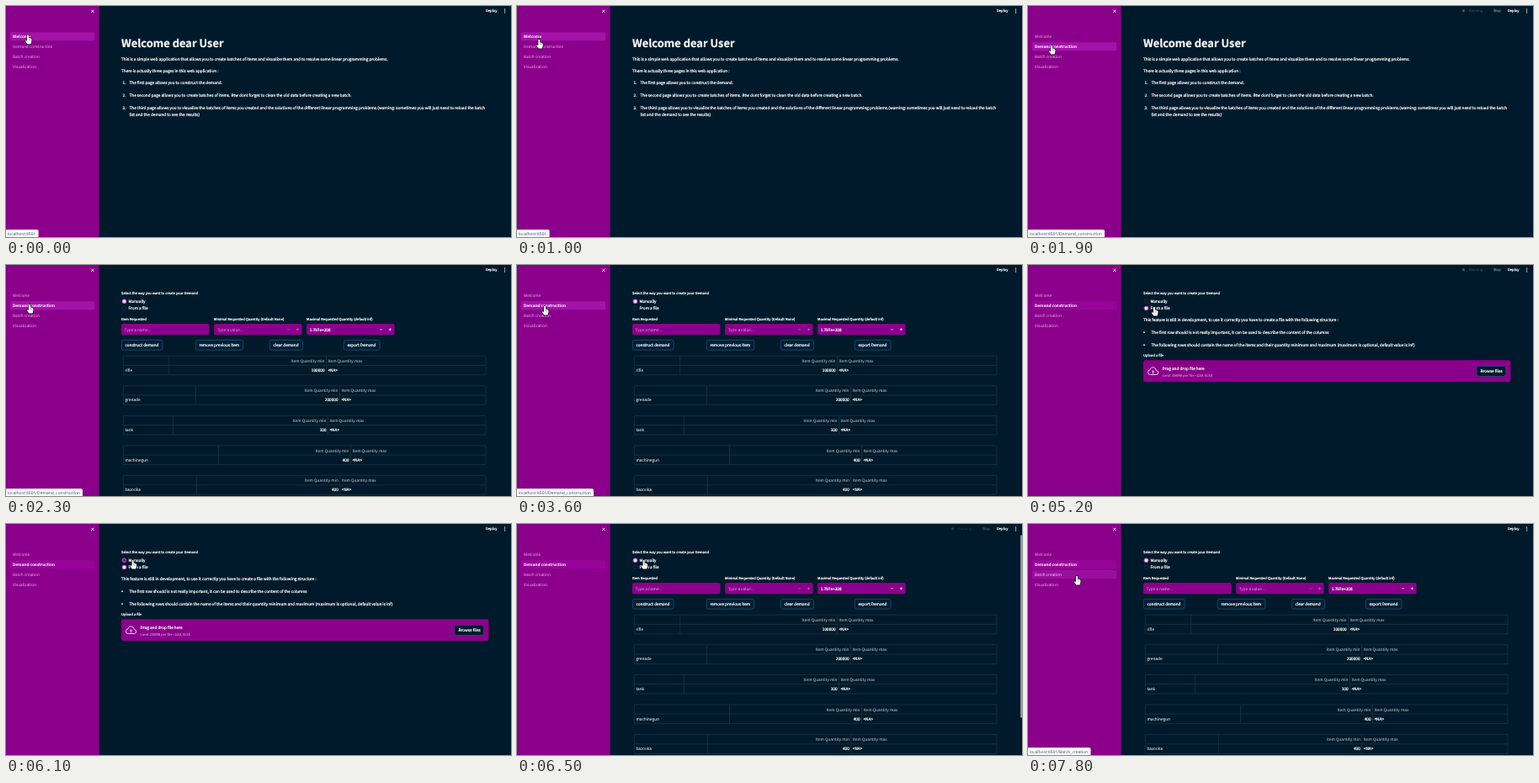
Animation of 600 by 275 pixels, one loop 8 s. Source, as an HTML page with a canvas:

```html
<!DOCTYPE html>
<html lang="en">
<head>
<meta charset="utf-8">
<title>Demand planner</title>
<style>
html, body { margin: 0; width: 100%; height: 100%; overflow: hidden; background: #001a2b; }
canvas { display: block; width: 600px; height: 275px; }
</style>
</head>
<body>
<canvas id="stage"></canvas>
<script>
const W = 600, H = 275, LOOP = 8000, STEP = 100;
const canvas = document.getElementById('stage');
const dpr = window.devicePixelRatio || 1;
canvas.width = W * dpr;
canvas.height = H * dpr;
const ctx = canvas.getContext('2d');

const BG = '#001a2b', PURPLE = '#8b008b', WHITE = '#fafafa';
const DIM = '#b0bac3', PINK = '#e096e2', LINE = '#1c3445';
const SANS = '"Noto Sans CJK JP", "Noto Sans CJK SC", "Noto Sans CJK", "Open Sans", sans-serif';
const BODY = 4.715, SMALL = 4.12, TITLE = 12.9;
const ZOOM = 20; // lay text out large, then shrink, for even spacing

// y is the middle of the capitals
function text(str, x, y, o = {}) {
  const { size = BODY, color = WHITE, bold = false, align = 'left', family = SANS, heavy = 0.24 } = o;
  ctx.save();
  ctx.translate(x, y + size * 0.366);
  ctx.scale(1 / ZOOM, 1 / ZOOM);
  ctx.font = `${bold ? 700 : 400} ${size * ZOOM}px ${family}`;
  ctx.textAlign = align;
  ctx.fillStyle = ctx.strokeStyle = color;
  ctx.fillText(str, 0, 0);
  if (heavy) {
    ctx.lineWidth = heavy * ZOOM;
    ctx.lineJoin = 'round';
    ctx.strokeText(str, 0, 0);
  }
  ctx.restore();
}

function box(x, y, w, h, r, fill, stroke) {
  ctx.beginPath();
  ctx.roundRect(x, y, w, h, r);
  if (fill) { ctx.fillStyle = fill; ctx.fill(); }
  if (stroke) { ctx.strokeStyle = stroke; ctx.lineWidth = 0.7; ctx.stroke(); }
}

function dot(x, y, r, fill) {
  ctx.beginPath();
  ctx.arc(x, y, r, 0, Math.PI * 2);
  ctx.fillStyle = fill;
  ctx.fill();
}

function lines(color, width, ...segs) {
  ctx.beginPath();
  for (const [x1, y1, x2, y2] of segs) {
    ctx.moveTo(x1, y1);
    ctx.lineTo(x2, y2);
  }
  ctx.strokeStyle = color;
  ctx.lineWidth = width;
  ctx.stroke();
}

function minus(x, y, color) {
  lines(color, 0.7, [x - 1.3, y, x + 1.3, y]);
}

function plus(x, y, color) {
  lines(color, 0.8, [x - 1.5, y, x + 1.5, y], [x, y - 1.5, x, y + 1.5]);
}

const MENU = ['Welcome', 'Demand construction', 'Batch creation', 'Visualization'];

function sidebar(active, hover) {
  ctx.fillStyle = PURPLE;
  ctx.fillRect(0, 0, 110.6, H);
  lines('#ffffff', 0.9, [101.2, 4.7, 104.4, 7.9], [104.4, 4.7, 101.2, 7.9]);
  MENU.forEach((name, i) => {
    const y = 36.2 + i * 11.9;
    if (i === active) box(5, y - 4.9, 100, 10, 1.3, '#98049a');
    if (i === hover) box(5, y - 4.9, 100, 10, 1.3, 'rgba(210,90,230,.18)');
    if (i === active) text(name, 8, y, { bold: true, heavy: 0.06 });
    else text(name, 8, y, { color: i === hover ? '#ecbdec' : PINK, heavy: 0.06 });
  });
}

function toolbar(running) {
  text('Deploy', 570, 5.7, { size: SMALL });
  for (let i = 0; i < 3; i++) dot(592.6, 3.9 + i * 2, 0.65, WHITE);
  if (!running) return;
  ctx.globalAlpha = running;
  dot(517.5, 5.7, 1.6, DIM);
  text('Running...', 524, 5.7, { size: SMALL, color: DIM, heavy: 0 });
  text('Stop', 553, 5.7, { size: SMALL });
  ctx.globalAlpha = 1;
}

function welcomePage() {
  text('Welcome dear User', 137, 44.3, { size: TITLE, bold: true });
  text('This is a simple web application that allows you to create batches of items and visualize them and to resolve some linear programming problems.', 137, 63.2);
  text('There is actually three pages in this web application :', 137, 76.9);
  const list = [
    ['The first page allows you to construct the demand.', 91.5],
    ['The second page allows you to create batches of items. Btw dont forget to clean the old data before creating a new batch.', 106.3],
    ['The third page allows you to visualize the batches of items you created and the solutions of the different linear programming problems.(warning: sometimes you will just need to reload the batch', 121.2]
  ];
  list.forEach(([str, y], i) => {
    text(`${i + 1}.`, 138.6, y);
    text(str, 146.5, y);
  });
  text('list and the demand to see the results)', 146.5, 129.6);
}

function radio(y, label, on, pressed) {
  if (on) {
    dot(140.5, y, 2.8, '#c45fcb');
    dot(140.5, y, 1.7, '#f6e6f7');
  } else {
    dot(140.5, y, 2.7, pressed ? '#b04cba' : '#1b2a45');
    dot(140.5, y, 1.8, pressed ? '#6b2382' : '#03182a');
  }
  text(label, 145.5, y + 0.2);
}

function chooser(fromFile, pressed) {
  text('Select the way you want to create your Demand', 137, 33.4, { size: SMALL });
  radio(43.3, 'Manually', !fromFile, pressed);
  radio(51.5, 'From a file', fromFile, false);
}

function field(x, label, value, color, stepColor) {
  text(label, x, 64.4, { size: SMALL });
  box(x, 69.9, 104.5, 13.4, 2, PURPLE);
  text(value, x + 3.6, 76.8, { color, heavy: color === WHITE ? 0.24 : 0.04 });
  if (stepColor) {
    minus(x + 88.5, 76.8, stepColor);
    plus(x + 99.3, 76.8, stepColor);
  }
}

const BUTTONS = [
  ['construct demand', 137, 48.8], ['remove previous item', 225, 56.5],
  ['clear demand', 313, 39.2], ['export Demand', 401, 42.8]
];

function form() {
  field(137, 'Item Requested', 'Type a name...', PINK);
  field(247.1, 'Minimal Requested Quantity (Default None)', 'Type a value...', PINK, '#bd66c0');
  field(357.1, 'Maximal Requested Quantity (default inf)', '1.797e+308', WHITE, WHITE);
  for (const [label, x, w] of BUTTONS) {
    box(x + 0.3, 89.4, w, 11.8, 2.2, '#021f35', '#28547c');
    text(label, x + 4.4, 95.4);
  }
}

const TABLES = [
  ['rifle', 100000, 193.7, 380.5], ['grenade', 200000, 225.4, 396.5],
  ['tank', 100, 198.5, 382.5], ['machinegun', 400, 252.5, 409.5],
  ['bazooka', 400, 226.3, 396.8]
];

function table([name, min, x1, x2], i) {
  const y = 108.2 + i * 35.6, mid = y + 11.2, end = y + 22.6;
  lines(LINE, 0.8,
    [139.3, y, 570, y], [139.3, mid, 570, mid], [139.3, end, 570, end],
    [139.3, y, 139.3, end], [x1, y, x1, end], [x2, y, x2, end], [570, y, 570, end]);
  const head = { color: DIM, heavy: 0.08 };
  text('Item Quantity min', x2 - 2, y + 5.8, { ...head, align: 'right' });
  text('Item Quantity max', x2 + 2, y + 5.8, head);
  text(name, 141.4, y + 16.8, { color: '#dde2e6', heavy: 0.1 });
  text(String(min), x2 - 2, y + 16.8, { align: 'right' });
  text('<NA>', x2 + 2, y + 16.8);
}

function cloud(x, y) {
  ctx.beginPath();
  ctx.moveTo(x + 3, y + 9);
  ctx.arc(x + 3, y + 6.2, 2.8, Math.PI / 2, Math.PI * 1.45);
  ctx.arc(x + 6.2, y + 4, 3.6, Math.PI * 1.08, Math.PI * 1.92);
  ctx.arc(x + 10, y + 6.6, 2.4, Math.PI * 1.5, Math.PI / 2);
  ctx.closePath();
  ctx.strokeStyle = '#eccdec';
  ctx.lineWidth = 1;
  ctx.stroke();
  lines('#eccdec', 0.9, [x + 6.2, y + 8, x + 6.2, y + 4.3],
    [x + 4.6, y + 5.9, x + 6.2, y + 4.3], [x + 7.8, y + 5.9, x + 6.2, y + 4.3]);
}

function uploadPage() {
  text('This feature is still in development, to use it correctly you have to create a file with the following structure :', 137, 65.2);
  const items = [
    'The first row should is not really important, it can be used to describe the content of the columns',
    'The following rows should contain the name of the items and their quantity minimum and maximum (maximum is optional, default value is inf)'
  ];
  items.forEach((str, i) => {
    dot(138, 80.2 + i * 15, 0.9, WHITE);
    text(str, 146.5, 80 + i * 15);
  });
  text('Upload a file', 137, 107.4, { size: SMALL });
  box(137, 113.2, 436.5, 26, 2.4, PURPLE);
  cloud(142.3, 121.5);
  text('Drag and drop file here', 159.6, 123.2);
  text('Limit 200MB per file • CSV, XLSX', 159.6, 131.2, { size: SMALL, color: '#e3b0e4', heavy: 0.05 });
  box(533, 120.4, 34.7, 12, 2.2, BG, '#28547c');
  text('Browse files', 537.4, 126.5);
}

function statusBubble(path, width) {
  box(-2, 266.2, width + 2, 11, [0, 1.5, 0, 0], '#ffffff');
  text('localhost:8501' + path, 2, 271.2,
    { size: 4.94, color: '#56657c', family: '"Open Sans", sans-serif', heavy: 0.08 });
}

// time, x, y of the pointer tip
const MOVES = [
  [0, 26, 34.6], [900, 26, 34.8], [1000, 26.3, 40], [1300, 28, 47], [3500, 28, 47],
  [3700, 38, 51], [3800, 38, 51], [4000, 50, 60], [4200, 72, 62], [4400, 122, 56],
  [4700, 150, 50], [5600, 150, 50], [6000, 150.6, 43], [6500, 150.6, 43],
  [6700, 146, 45], [7100, 92, 60], [7400, 61, 61], [7500, 58, 62], [8000, 58, 62]
];

function pointerAt(t) {
  const i = Math.max(1, MOVES.findIndex(m => m[0] >= t));
  const [t0, x0, y0] = MOVES[i - 1], [t1, x1, y1] = MOVES[i];
  const k = (t - t0) / (t1 - t0);
  return [x0 + (x1 - x0) * k, y0 + (y1 - y0) * k];
}

const HAND = [
  [-0.9, 0], [0.9, 0], [1, 3.6], [2.3, 3.5], [3.6, 4.2], [4.5, 4.9],
  [4.3, 8], [3.5, 10.6], [-0.7, 10.6], [-3, 7.2], [-2.6, 6], [-1, 7]
];
const ARROW = [
  [0, 0], [0, 8.2], [1.8, 6.6], [3, 9.4], [4.3, 8.8], [3.1, 6.1], [5.4, 6]
];

function pointer(x, y, hand) {
  ctx.save();
  ctx.translate(x, y);
  ctx.beginPath();
  for (const [px, py] of hand ? HAND : ARROW) ctx.lineTo(px, py);
  ctx.closePath();
  ctx.lineJoin = 'round';
  ctx.strokeStyle = '#10101c';
  ctx.lineWidth = 1.3;
  ctx.stroke();
  ctx.fillStyle = '#ffffff';
  ctx.fill();
  if (hand) lines('#55505e', 0.4, [1, 4, 1, 6.6], [2.6, 4.4, 2.6, 6.8]);
  ctx.restore();
}

const within = (t, a, b) => t >= a && t < b;

function runningAt(t) {
  if (within(t, 1900, 2300) || within(t, 5000, 5500)) return 0.4;
  if (within(t, 6400, 6700)) return 0.22;
  return 0;
}

function draw(t) {
  ctx.setTransform(dpr, 0, 0, dpr, 0, 0);
  ctx.globalAlpha = 1;
  if ('textRendering' in ctx) ctx.textRendering = 'geometricPrecision';
  ctx.fillStyle = BG;
  ctx.fillRect(0, 0, W, H);

  const [x, y] = pointerAt(t);
  const hover = x < 105 ? Math.floor((y - 31.3) / 11.9) : -1;
  sidebar(t < 1800 ? 0 : 1, hover);
  toolbar(runningAt(t));

  if (t < 2000) {
    welcomePage();
  } else {
    chooser(within(t, 4800, 6200), within(t, 6000, 6200));
    if (within(t, 5100, 6300)) {
      uploadPage();
    } else {
      form();
      const shown = t < 2300 ? (t - 2000) / 50 : TABLES.length;
      TABLES.slice(0, shown).forEach(table);
    }
  }

  if (within(t, 4500, 5100) || within(t, 6400, 7000)) {
    box(598.2, 13.2, 1.8, 217.5, 0.9, '#9aa7b2');
  }

  if (t < 1200) statusBubble('', 38.6);
  else if (t < 3900) statusBubble('/Demand_construction', 91);
  else if (within(t, 3900, 4600) || t >= 7700) statusBubble('/Batch_creation', 74.5);

  pointer(x, y, x < 105 || x > 136);
}

const start = performance.now();
function frame() {
  const t = (performance.now() - start) % LOOP;
  draw(Math.floor(t / STEP) * STEP);
  requestAnimationFrame(frame);
}
draw(0);
requestAnimationFrame(frame);
</script>
</body>
</html>
```
